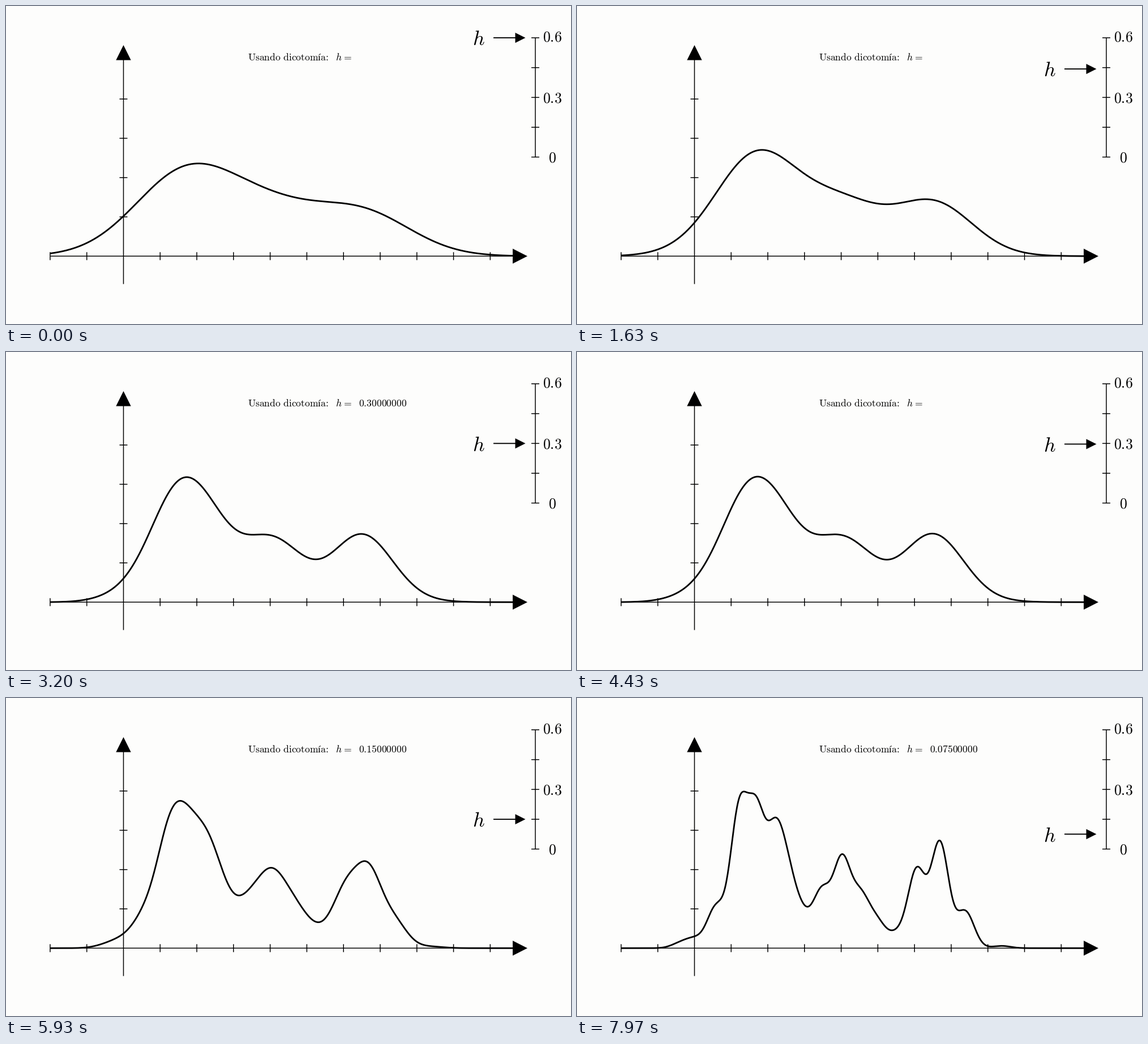
Write a matplotlib script that moves like this. It is 998 px wide and 561 px high and loops after 8 s.

```python
import matplotlib.pyplot as plt
import numpy as np
from matplotlib.animation import FuncAnimation

W, H, DPI = 998, 561, 64
FRAMES, STEP = 320, 25
ORIGIN_X, BASE_Y = 207.5, 441.3
TICK_X, TICK_Y = 64.78, 69.3

plt.rcParams["mathtext.fontset"] = "cm"
plt.rcParams["path.snap"] = False
fig = plt.figure(figsize=(W / DPI, H / DPI), dpi=DPI, facecolor="#fdfdfc")
ax = fig.add_axes([0, 0, 1, 1])
ax.set_xlim(0, W)
ax.set_ylim(H, 0)
ax.axis("off")


def pt(px):
    return px * 72 / DPI


def line(x, y, lw=1.5):
    return ax.plot(x, y, color="black", lw=pt(lw), solid_capstyle="butt")[0]


def triangle(points):
    return ax.fill(*zip(*points), color="black", lw=0)[0]


def label(x, y, text, size, ha="left"):
    return ax.text(x, y, f"${text}$", fontsize=pt(size), ha=ha,
                   va="baseline", color="black")


# Clusters of the sample: centre and weight
CENTRES, WEIGHTS = np.array([
    (182, 8), (207, 15), (245, 70), (286, 232), (317, 218), (350, 175),
    (373, 98), (398, 45), (432, 95), (468, 151), (501, 83), (530, 42),
    (565, 22), (600, 136), (641, 185), (686, 64), (750, 4)]).T
SPREAD = 12.1           # spread inside a cluster, px
UNIT = 2 * TICK_X       # px per unit of bandwidth
XS = np.linspace(78, 900, 700)


def density(h):
    s = np.hypot(SPREAD, UNIT * h)
    bumps = np.exp(-((XS[:, None] - CENTRES) / s) ** 2 / 2)
    return bumps @ WEIGHTS * 15.5 / s


# Each move halves the bandwidth: start and duration in ms
MOVES = [(140, 2900), (4210, 1530), (6730, 1000)]


def smooth(u):
    return u ** 3 * (10 - 15 * u + 6 * u * u)


def state(t):
    """Bandwidth at time t and whether it is at rest after a move."""
    h, done = 0.6, False
    for start, length in MOVES:
        u = min((t - start) / length, 1)
        if u >= 0:
            h *= 1 - smooth(u) / 2
            done = u == 1
    return h, done


def scale_y(h):
    return 266.5 - h / 0.6 * 210.4


# Main axes
line([78, 897], [BASE_Y] * 2)
line([ORIGIN_X] * 2, [93, 490.5])
for k in range(-2, 11):
    if k:
        line([ORIGIN_X + k * TICK_X] * 2, [BASE_Y - 7, BASE_Y + 7])
for k in range(1, 5):
    line([ORIGIN_X - 7, ORIGIN_X + 7], [BASE_Y - k * TICK_Y] * 2)
triangle([(921, BASE_Y), (895, BASE_Y - 13.2), (895, BASE_Y + 13.2)])
triangle([(ORIGIN_X, 69), (ORIGIN_X - 13.2, 95.5), (ORIGIN_X + 13.2, 95.5)])

# Bandwidth scale
line([935, 935], [scale_y(0), scale_y(0.6)])
for k in range(5):
    line([928, 942], [scale_y(0.15 * k)] * 2)
for text, y in (("0.6", 62.5), ("0.3", 170.5), ("0", 275)):
    label(965, y, text, 25.9, "center")

label(427.5, 96, r"\mathrm{Usando\ dicotomía\hspace{-0.2}:}", 17.6)
label(582.3, 96, r"h\hspace{0.08}=", 17.6)

curve = line([], [], 2.8)
shaft = line([], [], 1.9)
head = triangle([(917.5, 0), (899.5, -9), (899.5, 9)])
name = label(824, 69, "h", 36)
value = label(622.8, 96, "0", 17.6)


def draw(i):
    h, done = state(i * STEP)
    y = scale_y(h)
    curve.set_data(XS, BASE_Y - density(h))
    shaft.set_data([861, 901], [y, y])
    head.set_xy([(917.5, y), (899.5, y - 9), (899.5, y + 9)])
    name.set_y(y + 13.3)
    value.set_text(f"${h:.8f}$")
    value.set_visible(done)
    return curve, shaft, head, name, value


anim = FuncAnimation(fig, draw, frames=FRAMES, interval=STEP,
                     init_func=lambda: draw(0), repeat=True, repeat_delay=0)
plt.show()
```
